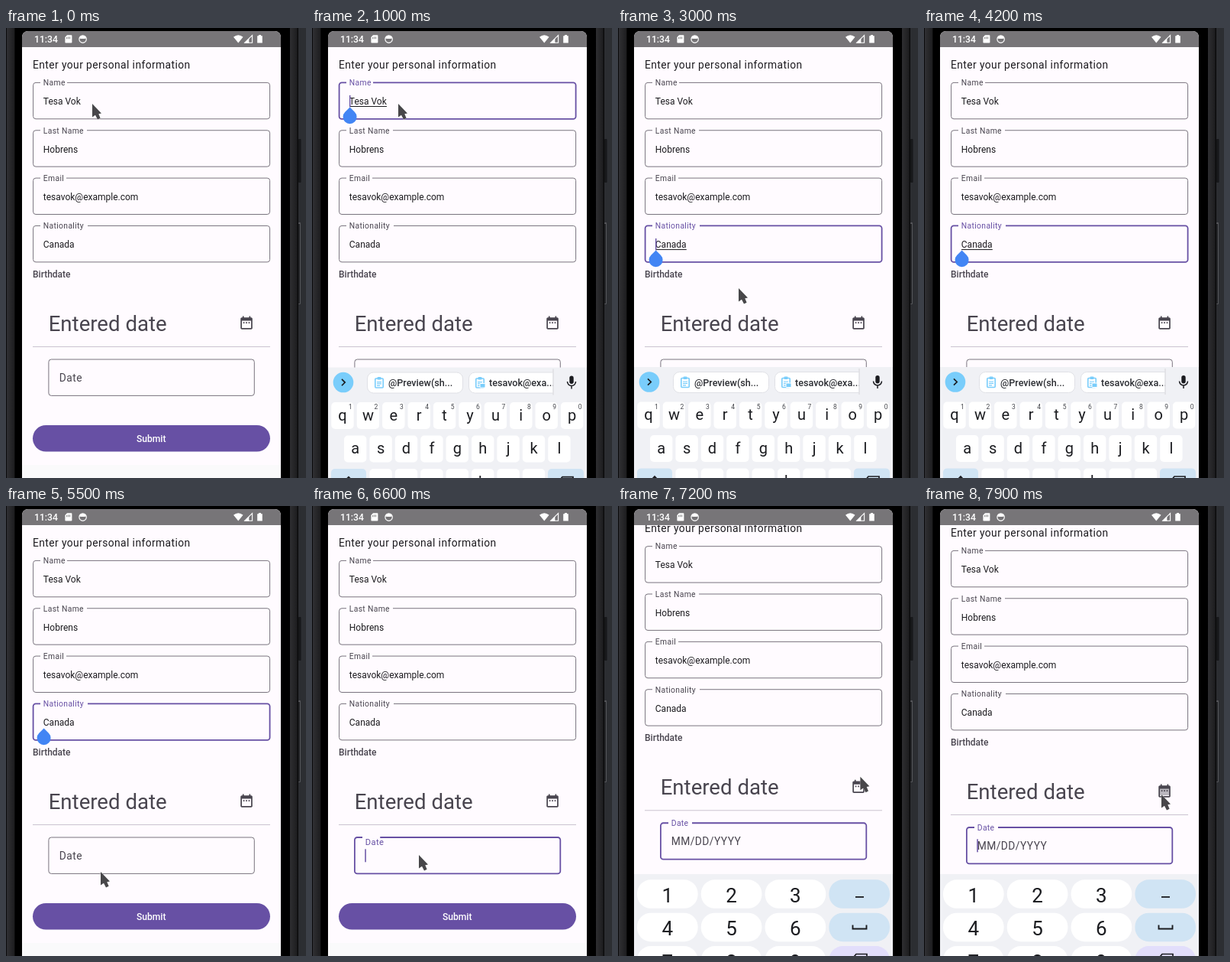
An HTML page for the animation above (8 s loop, 393 by 588 pixels).

```html
<!DOCTYPE html>
<html lang="en">
<head>
<meta charset="utf-8">
<title>Personal information form</title>
<style>
  html, body { margin: 0; width: 100%; height: 100%; overflow: hidden; background: #2c2e32; }
  svg { display: block; font-family: Roboto, sans-serif; }
  .value { font-size: 12px; fill: #1c1b1f; }
  .label { font-size: 10.35px; letter-spacing: .345px; fill: #49454f; }
  .body { font-size: 13.8px; letter-spacing: .43px; }
  .soft { fill: #49454f; }
  .outline { fill: none; stroke: #79747e; stroke-width: 1; }
  .focused .outline { stroke: #6750a4; stroke-width: 1.8; }
  .focused .label { fill: #6750a4; }
  .caret { fill: #6750a4; }
  .mid { text-anchor: middle; }
  .key { font-size: 20px; fill: #1b1c20; text-anchor: middle; }
  .hint { font-size: 8.5px; fill: #44464c; text-anchor: middle; }
  .digit { font-size: 26px; fill: #1b1c20; text-anchor: middle; }
  .chip { font-size: 12.6px; font-weight: 500; fill: #2c2e33; }
</style>
</head>
<body>
<svg id="stage" width="393" height="588" viewBox="0 0 393 588"></svg>
<script>
const LOOP = 8000;
const stage = document.getElementById('stage');

const rect = (x, y, w, h, fill, r = 0, more = '') =>
  `<rect x="${x}" y="${y}" width="${w}" height="${h}" rx="${r}" fill="${fill}" ${more}/>`;
const text = (x, y, cls, str, more = '') =>
  `<text x="${x}" y="${y}" class="${cls}" ${more}>${str}</text>`;
const path = (d, fill, more = '') => `<path d="${d}" fill="${fill}" ${more}/>`;
const line = (d, color, width) => path(d, 'none', `stroke="${color}" stroke-width="${width}"`);

// Form
const PAGE = '#fffbff';
const FIELD_TOP = 71.4, FIELD_PITCH = 62.35;
const fieldTop = i => FIELD_TOP + i * FIELD_PITCH;
const fields = [
  ['Name', 'Tesa Vok', 34],
  ['Last Name', 'Hobrens', 60],
  ['Email', 'tesavok@example.com', 33],
  ['Nationality', 'Canada', 61],
];

const field = ([label, value, gap], i) => {
  const y = fieldTop(i);
  return `<g class="field">
    ${rect(35.6, y, 310, 47.4, 'none', 3.4, 'class="outline"')}
    ${rect(45, y - 2, gap + 1, 4, PAGE)}
    ${text(48.8, y + 3.8, 'label', label)}
    ${text(48.8, y + 28.8, 'value', value)}
    ${rect(49, y + 30.6, 0, 1, '#1c1b1f', 0, 'class="underline"')}
    ${rect(49, y + 16.5, 1.4, 15.5, '', 0, 'class="caret"')}
  </g>`;
};

const calendar = 'M9 11H7v2h2v-2zm4 0h-2v2h2v-2zm4 0h-2v2h2v-2zm2-7h-1V2h-2v2H8V2H6v2H5c-1.1 0-2 .9-2 2v14c0 1.1.9 2 2 2h14c1.1 0 2-.9 2-2V6c0-1.1-.9-2-2-2zm0 16H5V9h14v11z';

const form = `
  ${text(35, 53.2, 'body', 'Enter your personal information', 'fill="#1c1b1f"')}
  ${fields.map(field).join('')}
  ${text(35, 326, 'soft', 'Birthdate', 'font-size="12" font-weight="500"')}
  ${text(55.7, 395.6, 'soft', 'Entered date', 'font-size="27.6"')}
  ${rect(309, 379, 13, 12, '#b9b6bd', 0, 'id="pressed"')}
  ${path(calendar, '#49454f', 'transform="translate(304.7 374.7) scale(.8626)"')}
  ${rect(35, 416, 311, 1, '#cac4d0')}
  <g id="date">
    ${rect(55.9, 433, 269.4, 47.4, 'none', 3.4, 'class="outline"')}
    ${rect(66, 431, 31, 4, PAGE, 0, 'id="dateGap"')}
    <g id="dateLabel">${text(0, 0, 'label', 'Date', 'style="font-size:13.8px;letter-spacing:.43px"')}</g>
    ${text(69.8, 462.2, 'body soft', 'MM/DD/YYYY', 'id="pattern"')}
    ${rect(69.3, 448.3, 1.5, 17, '', 0, 'class="caret"')}
  </g>
  ${rect(35, 519, 311, 34.5, '#6750a4', 17.25)}
  ${text(190.2, 541, 'mid', 'Submit', 'font-size="12.1" font-weight="500" fill="#fff"')}
  <g id="handle">${path('M0 -12.5L6.3 -6.2A9 9 0 1 1 -6.3 -6.2Z', '#4285f4')}</g>`;

// Keyboards
const KEYS = '#f0f1f5', BLUE = '#d0e4f4', SKY = '#79cdfb', INK = '#1b1c20';
const PITCH = 33.4;
const keyRow = (letters, x0, y, hints) => [...letters].map((c, i) => {
  const x = x0 + i * PITCH;
  return rect(x - 14.7, y, 29.4, 35, '#fff', 5) + text(x, y + 23.5, 'key', c) +
    (hints ? text(x + 10.5, y + 9.3, 'hint', (i + 1) % 10) : '');
}).join('');

const clipboard = x => `
  ${rect(x - 5.2, 457.5, 10.4, 12, 'none', 1, `stroke="${SKY}" stroke-width="1.6"`)}
  ${rect(x - 2.5, 455.5, 5, 3.5, SKY, 1)}
  ${line(`M${x - 3} 462h6m-6 2.4h6m-6 2.4h4`, SKY, 1.2)}`;
const backspace = (x, y) => line(`M${x - 10} ${y + 6}l5 -6h14v12h-14zm7 -3l6 6m0 -6l-6 6`, INK, 1.7);

const letterPad = `
  ${rect(21, 443, 339, 460, KEYS)}
  <circle cx="41" cy="462.5" r="13.3" fill="${SKY}"/>
  ${line('M39 458.3l4.2 4.2 -4.2 4.2', INK, 1.7)}
  <g clip-path="url(#chips)">
    ${rect(72.5, 449.5, 125, 27, '#fff', 8, 'stroke="#e0e1e6"')}
    ${clipboard(88)}${text(100, 467.6, 'chip', '@Preview(sh...')}
    ${rect(205.5, 449.5, 130, 27, '#fff', 8, 'stroke="#e0e1e6"')}
    ${clipboard(220)}${rect(220, 464, 7, 5.5, SKY, 1, 'stroke="#fff"')}
    ${text(232, 467.6, 'chip', 'tesavok@exa...')}
  </g>
  ${rect(315.5, 445, 1, 34, '#d5d6da')}
  ${rect(337.3, 454, 5.4, 10.5, INK, 2.7)}
  ${line('M334.5 461.5a5.5 5.5 0 0 0 11 0M340 467v4', INK, 1.5)}
  ${keyRow('qwertyuiop', 40, 488.5, true)}
  ${keyRow('asdfghjkl', 56.7, 532)}
  ${keyRow('zxcvbnm', 90.1, 575.5)}
  ${rect(25, 575.5, 46, 35, BLUE, 5)}${line('M40 594l8 -8 8 8h-4v6h-8v-6z', INK, 1.6)}
  ${rect(309, 575.5, 47, 35, BLUE, 5)}${backspace(333, 586)}`;

const numberKey = (n, i) => {
  const x = 25 + (i % 3) * 83.8, y = 488.3 + Math.floor(i / 3) * 43.4;
  return rect(x, y, 79.6, 37.5, '#fff', 18) + text(x + 39.8, y + 29.5, 'digit', n);
};
const numberPad = `
  ${rect(21, 481, 339, 460, KEYS)}
  ${[1, 2, 3, 4, 5, 6, 7, 8, 9].map(numberKey).join('')}
  ${rect(276.4, 488.3, 79.6, 37.5, BLUE, 18)}${rect(311, 510, 11, 1.8, INK)}
  ${rect(276.4, 531.7, 79.6, 37.5, BLUE, 18)}${line('M307.5 547.5v5h18v-5', INK, 1.9)}
  ${rect(276.4, 575.1, 79.6, 37.5, '#e2defb', 18)}${backspace(317, 585.5)}`;

// Phone
const body = `
  ${rect(0, 0, 393, 588, '#2c2e32')}
  ${rect(-30, -40, 413, 700, '#0b0b0c')}
  ${rect(1, 0, 10, 588, 'url(#edge)')}${rect(371, 0, 10.5, 588, 'url(#edge)')}
  ${rect(12, 0, 360, 588, '#000')}
  ${rect(383, 145, 3.5, 57, '#17181a', 1)}
  ${rect(383, 254, 3, 107, '#55565a', 1)}${rect(383, 256, 2, 104, '#222326')}
  ${path('M21 588V12a8 8 0 0 1 8 -8H352a8 8 0 0 1 8 8V588z', PAGE)}
  ${rect(21, 571, 339, 17, '#fafafb')}`;

const statusBar = `
  ${path('M21 25V12a8 8 0 0 1 8 -8H352a8 8 0 0 1 8 8V25z', '#777578')}
  <g fill="#fff">
    ${text(37, 19, '', '11:34', 'font-size="12.2" font-weight="500"')}
    <path d="M80 9.3h5.6q.8 0 .8.8v8.6q0 .8-.8.8h-7.4q-.8 0-.8-.8v-6.6z"/>
    <path d="M79.6 12v2.3m2 -2.8v2.8m2 -2.8v2.8" stroke="#777578" stroke-width=".9"/>
    <circle cx="100.6" cy="14.6" r="4.7" fill="none" stroke="#fff" stroke-width="1.2"/>
    <path d="M96 13.5a4.8 4.8 0 0 1 9.2 0q-5 1.2-9.2 0z"/>
    <path d="M304.3 19.5L298 11.8q6.3 -5 12.6 0z"/>
    <path d="M312.8 19.2L322.6 9.5v9.7z" fill="none" stroke="#fff" stroke-width="1.1"/>
    <path d="M312 19.7l6.3 -6.3v6.3z"/>
    <path d="M331 9h3v1.3h1.8v9.2h-6.6v-9.2h1.8z"/>
  </g>`;

stage.innerHTML = `
  <defs>
    <linearGradient id="edge"><stop stop-color="#303033"/><stop offset="1" stop-color="#1d1d1f"/></linearGradient>
    <clipPath id="screen"><rect x="21" y="25" width="339" height="563"/></clipPath>
    <clipPath id="chips"><rect x="60" y="443" width="255.5" height="40"/></clipPath>
  </defs>
  ${body}
  <g clip-path="url(#screen)">
    <g id="form">${form}</g>
    <g id="letterPad">${letterPad}</g>
    <g id="numberPad">${numberPad}</g>
  </g>
  ${statusBar}
  <g id="mouse">${path('M0 0V17.5L4 14.8 7 20.5 10.6 18.7 8.3 13.2 12 12.4Z', '#48474a', 'stroke="#fff" stroke-opacity=".55" stroke-width="1" paint-order="stroke"')}</g>`;

// Motion: each row is a time followed by its values
const mousePath = [
  [0, 113, 99], [1300, 113, 99], [1500, 118, 152], [1600, 119, 156], [1800, 128, 217],
  [2100, 128, 217], [2400, 140, 285], [2550, 140, 285], [2700, 150, 327], [2850, 150, 327],
  [3000, 158, 340], [3700, 158, 340], [4100, 130, 512], [4200, 124, 600], [5300, 118, 600],
  [5500, 124, 478], [5600, 130, 488], [5850, 160, 524], [6100, 150, 490], [6300, 140, 456],
  [6650, 140, 456], [7000, 301, 403], [7300, 323, 337], [7500, 311, 377],
];
const scrollPath = [[6600, 0], [6900, 51], [7050, 51], [7250, 13]];
const letterPadPath = [[650, 290], [1050, 0], [4800, 0], [5150, 290]];
const numberPadPath = [[6550, 260], [6900, 0]];
const floatPath = [[6500, 0], [6650, 1]];
const focusTimes = [[0, -1], [550, 0], [1550, 1], [2050, 2], [2600, 3], [6500, 4]];

const smooth = k => k * k * (3 - 2 * k);
const easeOut = k => 1 - (1 - k) ** 3;

function track(steps, t, ease = smooth) {
  const next = steps.findIndex(s => s[0] > t);
  if (next === 0) return steps[0].slice(1);
  if (next < 0) return steps[steps.length - 1].slice(1);
  const a = steps[next - 1], b = steps[next];
  const k = ease((t - a[0]) / (b[0] - a[0]));
  return a.slice(1).map((v, i) => v + (b[i + 1] - v) * k);
}

const $ = id => document.getElementById(id);
const move = (id, x, y, scale = 1) => $(id).setAttribute('transform', `translate(${x} ${y}) scale(${scale})`);
const show = (el, on) => el.setAttribute('visibility', on ? 'visible' : 'hidden');

const inputs = [...document.querySelectorAll('.field'), $('date')];
const carets = inputs.map(el => el.querySelector('.caret'));
const underlines = [...document.querySelectorAll('.underline')];
const values = [...document.querySelectorAll('.value')];

function render(t) {
  const [since, active] = focusTimes.filter(s => s[0] <= t).pop();
  const backPressed = t >= 4800 && t < 5600;
  const blinkOn = Math.floor((t - since + (active === 4 ? -200 : 0)) / 500) % 2 === 0 || t - since < 200;
  const paused = backPressed || (t >= 4100 && t < 4800);

  inputs.forEach((el, i) => {
    el.classList.toggle('focused', i === active);
    show(carets[i], i === active && blinkOn && !paused);
  });
  underlines.forEach((el, i) => {
    el.setAttribute('width', values[i].getComputedTextLength());
    show(el, i === active && t < 4800);
  });

  show($('handle'), active >= 0 && active < 4);
  move('handle', 49.6, fieldTop(Math.max(active, 0)) + 44.6);

  const [float] = track(floatPath, t);
  move('dateLabel', 69.8, 462.2 - 25.4 * float, 1 - .25 * float);
  $('dateGap').setAttribute('width', 31 * float);
  show($('pattern'), float === 1);
  show($('pressed'), t >= 7900);

  move('form', 0, -track(scrollPath, t)[0]);
  move('letterPad', 0, track(letterPadPath, t, easeOut)[0]);
  move('numberPad', 0, track(numberPadPath, t, easeOut)[0]);
  move('mouse', ...track(mousePath, t));
}

const start = performance.now();
function tick() {
  render((performance.now() - start) % LOOP);
  requestAnimationFrame(tick);
}
render(0);
tick();
</script>
</body>
</html>
```
